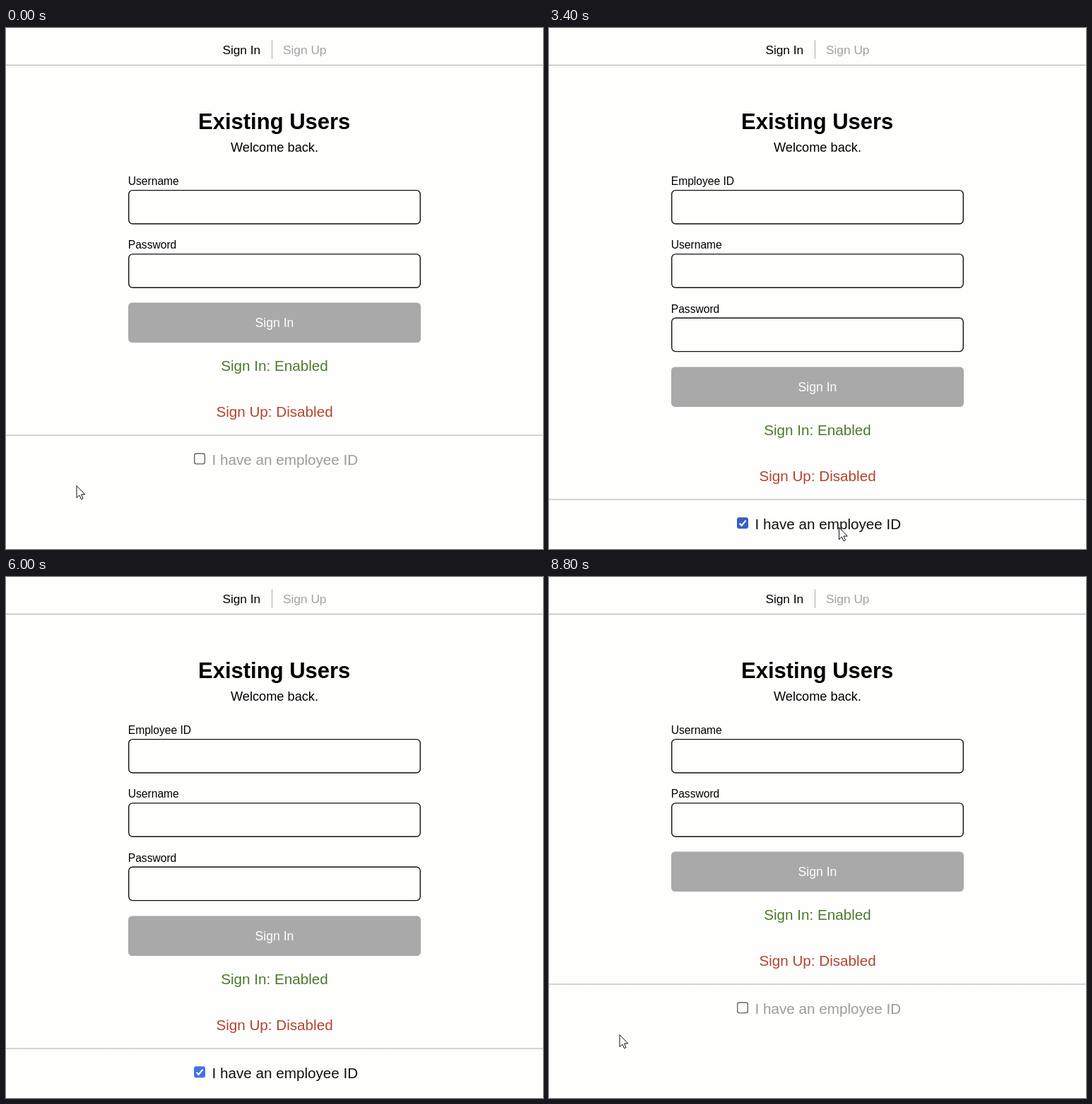
An HTML page that plays this animation: 760x737 px, repeating every 9 s.

```html
<!DOCTYPE html>
<html lang="en">
<head>
<meta charset="utf-8">
<title>Sign-in form</title>
<style>
  html, body { margin: 0; width: 100%; height: 100%; overflow: hidden; background: #fefefd; }
  svg { display: block; width: 760px; height: 737px; font-family: "Liberation Sans", Arial, sans-serif; }
  .mid { text-anchor: middle; }
  .tab { font-size: 17.3px; }
  .status { font-size: 20.65px; }
  .label { font-size: 15.6px; }
  .field { fill: #fefefd; stroke: #111; stroke-width: 1.4; }
  .rule { stroke: #555; stroke-dasharray: 1 1; }
</style>
</head>
<body>
<svg viewBox="0 0 760 737">
  <text class="tab" x="306.4" y="36.5">Sign In</text>
  <path class="rule" d="M376.5 18V43"/>
  <text class="tab" x="392" y="36.5" fill="#a2a2a2">Sign Up</text>
  <path class="rule" d="M0 52.5H760"/>
  <text class="mid" x="379.7" y="143" font-size="31" font-weight="bold">Existing Users</text>
  <text class="mid" x="380" y="175" font-size="18.2">Welcome back.</text>
  <g id="fields"></g>
  <g id="lower">
    <rect x="173" y="388.5" width="414" height="56.5" rx="5.5" fill="#a9a9aa"/>
    <text class="mid" x="380" y="422.5" font-size="17.6" fill="#fefefd">Sign In</text>
    <text class="mid status" x="380" y="484.7" fill="#4b7a2b">Sign In: Enabled</text>
    <text class="mid status" x="380" y="549.7" fill="#b1452f">Sign Up: Disabled</text>
    <path class="rule" d="M0 576H760"/>
    <rect id="box" x="266.7" y="602" width="14.6" height="14.6" rx="2.5" stroke-width="1.4"/>
    <path id="check" d="M269.6 609.8L272.6 612.8L278.6 605.6" fill="none" stroke="#fff" stroke-width="2.2"/>
    <text id="option" class="status" x="291.6" y="617.8">I have an employee ID</text>
  </g>
  <path id="cursor" d="M0 0V17L3.9 13.4L6.5 19.2L9 18.1L6.5 12.4H11.8Z" fill="#fff" stroke="#111" stroke-linejoin="round"/>
</svg>
<script>
const LOOP = 9000, STEP = 200, RESTART = 8800, SHIFT = 91, PITCH = 90.3;
const home = { x: 100, y: 647.5 };
// The pointer glides from `leave` to `arrive`, then clicks one step later.
const stops = [
  { leave: 0, arrive: 1600, x: 363, y: 611 },
  { leave: 3000, arrive: 3400, x: 410.5, y: 706.5 },
  { leave: 4800, arrive: 5200, x: 404.5, y: 620.5 },
  { leave: 6800, arrive: 7400, x: 427.5, y: 710.5 }
];
const clickTime = stop => Math.ceil((stop.arrive + 1) / 400) * 400;
const $ = id => document.getElementById(id);
const set = (id, attrs) => Object.entries(attrs).forEach(([k, v]) => $(id).setAttribute(k, v));
const ease = u => u * u * (3 - 2 * u);
const visible = on => on ? 'visible' : 'hidden';

function pointerAt(t) {
  return stops.reduce((p, s) => {
    const k = ease(Math.min(1, Math.max(0, (t - s.leave) / (s.arrive - s.leave))));
    return { x: p.x + (s.x - p.x) * k, y: p.y + (s.y - p.y) * k };
  }, home);
}

function showFields(names) {
  $('fields').innerHTML = names.map((name, i) => `
    <text class="label" x="172.8" y="${222 + i * PITCH}">${name}</text>
    <rect class="field" x="173.7" y="${229.6 + i * PITCH}" width="412.6" height="47.4" rx="5.5"/>`).join('');
}

let shown = null;
function draw(t) {
  const checked = stops.filter(s => clickTime(s) <= t).length % 2 === 1;
  if (checked !== shown) {
    showFields([...(checked ? ['Employee ID'] : []), 'Username', 'Password']);
    shown = checked;
  }
  const shift = checked ? SHIFT : 0;
  const away = t >= 6000 && t < 7000;
  const { x, y } = t < RESTART ? pointerAt(t) : home;
  const hover = !away && x > 262 && x < 500 && Math.abs(y - 612 - shift) < 14;
  const blue = hover ? '#3460c8' : '#4272e8';

  set('lower', { transform: `translate(0 ${shift})` });
  set('box', {
    fill: checked ? blue : '#fefefd',
    stroke: checked ? blue : hover ? '#4c4c4c' : '#666'
  });
  set('check', { visibility: visible(checked) });
  set('option', { fill: checked ? '#111' : '#9c9c9c' });
  set('cursor', { visibility: visible(!away), transform: `translate(${x} ${y})` });
}

const start = performance.now();
function tick() {
  const t = (performance.now() - start) % LOOP;
  draw(Math.floor(t / STEP) * STEP);
  requestAnimationFrame(tick);
}
tick();
</script>
</body>
</html>
```
